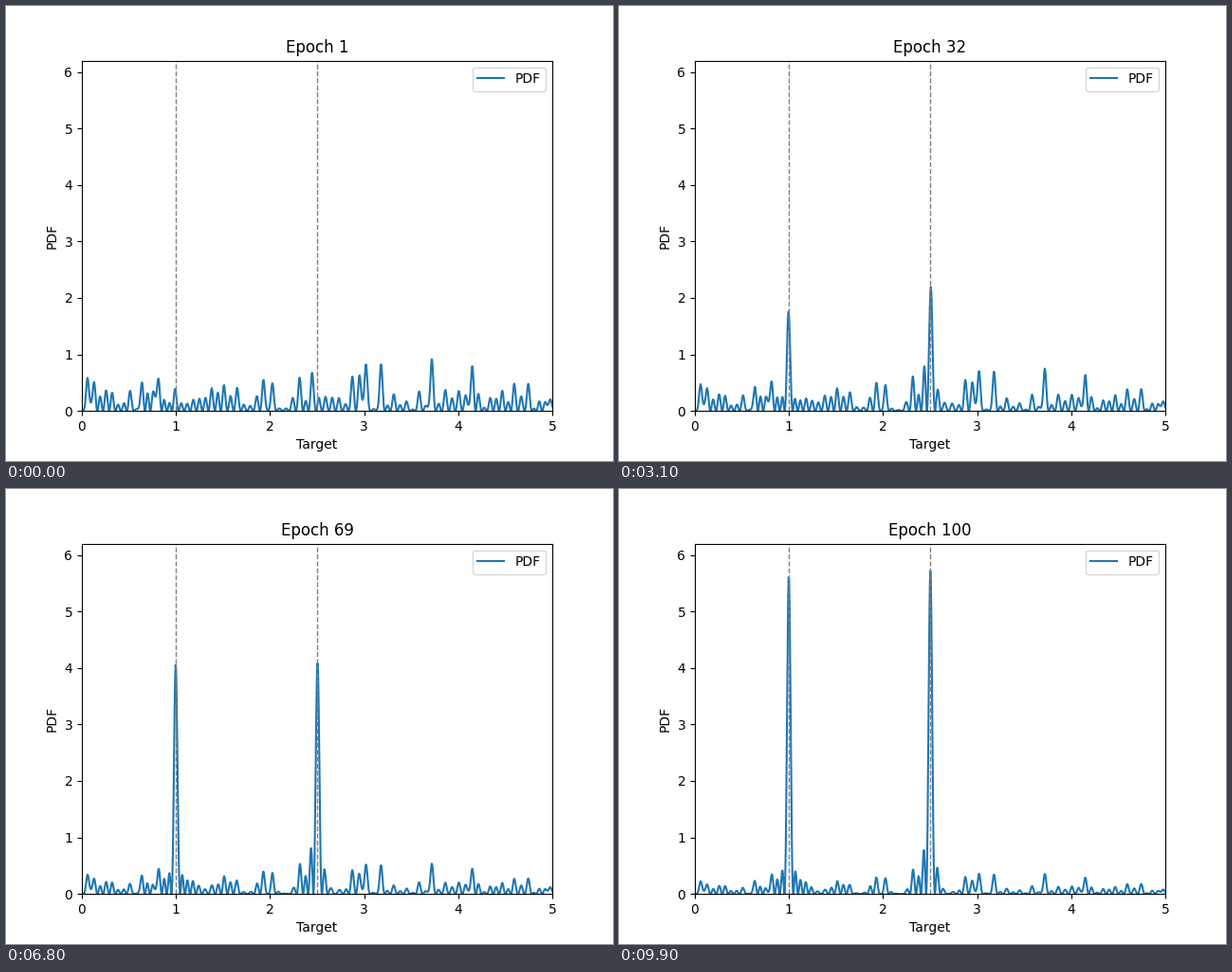
Animation, 640 px wide and 480 px high, one loop 10 s. Source, as a matplotlib script:

```python
import numpy as np
import matplotlib.pyplot as plt
from matplotlib.animation import FuncAnimation

EPOCHS = 100
CELL = 0.05    # resolution of the band-limited wave
WIDTH = 0.03   # width of one ripple
STEP = 0.067   # usual distance between ripples

# Main ripples of the starting wave: position, density with the wave's sign
MAIN = [(0.06, .58), (0.13, .52), (0.64, -.52), (0.815, -.56), (0.99, .32),
        (1.51, .47), (1.93, .56), (2.025, .50), (2.315, .62), (2.445, .71),
        (2.875, .63), (2.95, -.63), (3.02, -.83), (3.18, .84), (3.72, -.92),
        (4.15, .80), (4.595, -.49), (4.745, -.49), (4.98, .20)]


def ripples():
    """Main ripples, with small alternating ones spread over the gaps."""
    rng = np.random.default_rng(7)
    out = list(MAIN)
    for (x0, p0), (x1, _) in zip(MAIN, MAIN[1:]):
        count = max(1, round((x1 - x0) / STEP))
        for k in range(1, count):
            sign = np.sign(p0) * (-1) ** k
            out.append((x0 + (x1 - x0) * k / count,
                        sign * rng.uniform(0.03, 0.42)))
    return out


def start_wave(x):
    return sum(np.sign(p) * np.sqrt(abs(p)) * np.exp(-((x - c) / WIDTH) ** 2)
               for c, p in ripples())


def rise_slow(n):
    return -0.64 + 0.08 * n - 0.00017 * n ** 2 + 0.96 * np.exp(-n / 8)


def rise_steady(n):
    return 0.32 + 0.0537 * n - 0.25 * np.exp(-n / 5)


# Position, sign of the wave and height of each growing peak
TARGETS = [(1.0, 1, rise_slow), (2.5, -1, rise_steady)]

x = np.linspace(0, 5, 1000)
wave0 = start_wave(x)


def density(n):
    fade = np.sqrt(1 - 0.0064 * n)
    wave = fade * wave0
    for c, sign, rise in TARGETS:
        gain = sign * np.sqrt(rise(n)) - fade * start_wave(c)
        wave = wave + gain * np.sinc((x - c) / CELL)
    return wave ** 2


fig, ax = plt.subplots(figsize=(6.4, 4.8), dpi=100)
line, = ax.plot(x, density(0), label="PDF")
for c, _, _ in TARGETS:
    ax.axvline(c, color="gray", linestyle="--", linewidth=1)
ax.set(xlim=(0, 5), ylim=(0, 6.2), xlabel="Target", ylabel="PDF")
ax.legend(loc="upper right")
title = ax.set_title("Epoch 1")


def update(n):
    line.set_ydata(density(n))
    title.set_text(f"Epoch {n + 1}")
    return line, title


anim = FuncAnimation(fig, update, frames=EPOCHS, interval=100,
                     repeat=True, repeat_delay=0)
plt.show()
```
